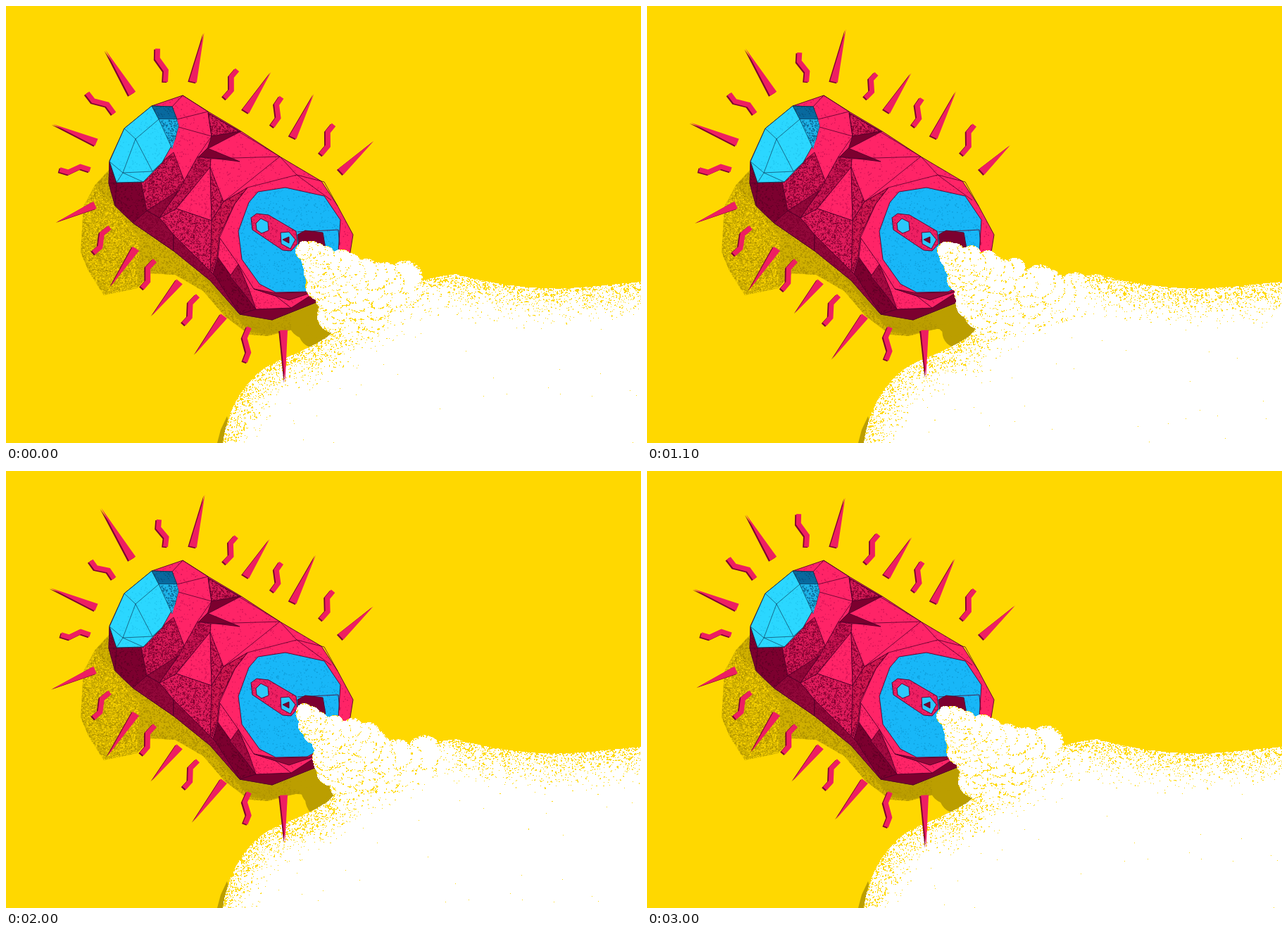
Animation, 902 px wide and 621 px high, one loop 3.1 s. Source, as an HTML page with a canvas:

```html
<!DOCTYPE html>
<html lang="en">
<head>
<meta charset="utf-8">
<title>Fizzing can</title>
<style>
html, body { margin: 0; height: 100%; overflow: hidden; background: #ffd800; }
canvas { display: block; }
</style>
</head>
<body>
<canvas id="stage" width="902" height="621"></canvas>
<script>
const W = 902, H = 621, LOOP = 3100, STEP = 100, TAU = Math.PI * 2;
const YELLOW = '#ffd800', SHADE = '#bb9e00', PINK = '#ff2467', DARK = '#7c002f', INK = '#53002a';

let seed = 7;
function rand() {
  seed = (seed + 0x6d2b79f5) | 0;
  let n = Math.imul(seed ^ (seed >>> 15), 1 | seed);
  n = (n + Math.imul(n ^ (n >>> 7), 61 | n)) ^ n;
  return ((n ^ (n >>> 14)) >>> 0) / 4294967296;
}

function layer(w, h) {
  const c = document.createElement('canvas');
  c.width = w;
  c.height = h;
  return c.getContext('2d', { willReadFrequently: true });
}

const stage = document.getElementById('stage').getContext('2d');
const still = layer(W, H);

// ---- can ----
const toPoints = text => text.split(' ').map(p => p.split(',').map(Number));
const toPath = text => new Path2D('M' + text + 'Z');

function speckle(text, color, density) {
  const pts = toPoints(text), xs = pts.map(p => p[0]), ys = pts.map(p => p[1]);
  const x = Math.min(...xs), y = Math.min(...ys);
  const w = Math.max(...xs) - x, h = Math.max(...ys) - y;
  still.save();
  still.clip(toPath(text));
  still.fillStyle = color;
  for (let i = w * h * density; i > 0; i--) {
    const size = 0.8 + rand() * 0.8;
    still.fillRect(x + rand() * w, y + rand() * h, size, size);
  }
  still.restore();
}

function facet(text, fill, dots, density, outline = INK) {
  const path = toPath(text);
  still.fillStyle = fill;
  still.fill(path);
  if (dots) speckle(text, dots, density);
  if (outline) {
    still.strokeStyle = outline;
    still.lineWidth = 0.9;
    still.stroke(path);
  }
}

function lines(d, color) {
  still.strokeStyle = color;
  still.lineWidth = 0.8;
  still.stroke(new Path2D(d));
}

function drawShadow() {
  facet('147,232 126,255 110,285 106,350 118,378 139,411 186,401 206,380 240,382 280,405 310,440 345,467 372,469 410,459 462,440 450,400 250,300',
    '#d0b000', '#aa8e00', 0.2, null);
  speckle('126,255 110,285 106,350 118,378 139,411 186,401 190,330 150,280', YELLOW, 0.2);
  facet('270,372 300,410 345,462 372,467 412,459 462,462 462,400', SHADE, '#ad9200', 0.1, null);
  facet('300,621 305,602 314,583 325,621', SHADE, null, 0, null);
}

function drawCan() {
  facet('207,142 251,127 287,150 334,178 389,214 448,249 471,284 493,325 489,350 448,418 378,446 332,438 290,390 238,348 180,308 155,284 146,252 147,220 168,174',
    PINK, '#d01255', 0.03);
  // underside
  facet('147,222 157,251 192,250 200,290 238,325 238,348 180,308 155,284 146,252', DARK, '#5c0024', 0.08);
  facet('192,250 222,221 238,208 256,256 240,268 200,291', '#d81a58', DARK, 0.3);
  facet('200,291 245,262 218,301', '#92083a', DARK, 0.2);
  facet('180,308 200,291 218,301 238,325 238,348', '#92083a', DARK, 0.25);
  // crease
  facet('287,152 332,178 292,186', '#d81a58', DARK, 0.3);
  facet('292,185 334,178 286,203', DARK);
  facet('274,214 286,202 332,221', DARK);
  facet('272,214 291,217 290,230 240,289 218,301 245,263', '#c91451', DARK, 0.25);
  facet('290,229 242,288 292,305', PINK, '#d01255', 0.06);
  facet('242,288 292,305 297,358 290,384 238,346 238,325 218,301', '#e01c5c', DARK, 0.22);
  facet('290,229 309,278 292,305', '#d81a58', DARK, 0.25);
  facet('309,278 343,258 325,281 303,326 300,356 290,386 292,305', '#d0174f', DARK, 0.22);
  facet('292,386 301,357 333,402 355,431 332,438', DARK, '#5c0024', 0.1);
  facet('238,325 297,384 332,438 290,390 238,348', '#92083a', DARK, 0.25);
  facet('332,438 355,431 405,429 450,400 448,418 378,446', DARK);
  facet('301,357 304,330 330,367 352,402 383,412 405,429 355,431 333,402', PINK, '#c91451', 0.06);
  facet('330,367 345,402 355,431 333,402 318,384', '#a50b42', DARK, 0.15);
  facet('352,402 383,408 430,407 452,394 450,402 402,418', '#92083a');
  lines('M236,143L251,127M243,161L287,150L292,185L272,214M245,172L292,185M251,127L287,150M291,217L389,214L413,240M309,278L389,214M343,258L413,240L452,250L471,284M413,240L462,276M343,258L325,281L303,330M146,252L157,251L155,284M287,152L389,214', INK);

  // blue base
  facet('207,142 236,143 245,170 240,190 222,222 195,250 157,251 147,221 168,174', '#2bd7ff', '#22c4ee', 0.04, '#12304a');
  facet('207,142 236,143 243,161 217,161', '#08699e', '#064f7c', 0.08, '#12304a');
  facet('217,161 243,161 245,171 236,203', '#1eb4e8', '#0a5f8c', 0.25, null);
  lines('M168,174L184,189L217,161L236,203M184,189L166,237L147,221M157,251L166,237L208,235L222,222M184,189L208,235M166,237L195,250', '#12506f');

  // blue lid
  facet('330,320 345,279 358,264 397,258 452,270 475,304 472,350 448,395 428,406 383,407 360,395 335,360',
    '#18b7f8', '#0f9cd8', 0.05, INK);
  lines('M414,321L472,318L474,340', INK);
  facet('414,325 425,319 450,322 454,345 417,347', DARK);
  facet('348,301 356,295 373,297 412,320 414,338 405,348 393,347 350,318', '#ee1f62', '#b80d4a', 0.08);
  facet('355,309 362,302 372,307 373,319 363,323 356,318', '#2bc8fc');
  facet('390,322 402,321 411,332 404,345 391,338', '#2bc8fc');
  facet('393,332 402,328 402,337', DARK);
}

still.fillStyle = YELLOW;
still.fillRect(0, 0, W, H);
drawShadow();
const ground = layer(W, H);
ground.drawImage(still.canvas, 0, 0);
still.clearRect(0, 0, W, H);
drawCan();

// ---- foam ----
const FX = 300, FY = 300, FW = W - FX, FH = H - FY, LIFE = 1500, CYCLE = 3000;
const foam = layer(FW, FH);
const cloud = new Path2D('M306,640C309,575 343,519 392,502C425,489 440,480 457,470C500,420 570,388 640,381C700,398 760,403 800,401S870,394 980,385V780H306Z');

const raw = Float32Array.from({ length: FW * FH }, rand);
const noise = raw.map((v, i) => {
  const at = k => raw[(i + k) % raw.length];
  return (v + at(1) + at(FW) + at(FW + 1)) / 4;
});

const bubbles = Array.from({ length: 150 }, (_, i) => ({
  born: i / 150,
  side: 2 * ((i * 0.618 + rand() * 0.12) % 1) - 1,
  size: 0.8 + rand() * 0.4
}));

function bubblesAt(ms) {
  return bubbles.map(b => {
    const age = ((ms / CYCLE + b.born) % 1) * CYCLE / LIFE;
    const angle = (41 + 24 * b.side) * Math.PI / 180;
    const reach = 6 + (180 - 55 * b.side) * age ** 1.1;
    return {
      age,
      x: 418 + Math.cos(angle) * reach,
      y: 340 + Math.sin(angle) * reach,
      r: (10 + 16 * age) * b.size
    };
  }).filter(b => b.age < 1).sort((a, b) => b.age - a.age);
}

const gray = v => `rgb(${v},${v},${v})`;

function drawFoam(list, frame) {
  foam.setTransform(1, 0, 0, 1, 0, 0);
  foam.clearRect(0, 0, FW, FH);
  foam.translate(-FX, -FY);

  // brightness is the share of white grain
  foam.save();
  foam.clip(cloud);
  foam.fillStyle = gray(237);
  foam.fill(cloud);
  foam.strokeStyle = 'rgba(0,0,0,.055)';
  for (let w = 8; w < 140; w += 15) {
    foam.lineWidth = w;
    foam.stroke(cloud);
  }
  foam.restore();

  for (const { x, y, r, age } of list) {
    const g = foam.createRadialGradient(x, y, 0, x, y, r);
    g.addColorStop(0, gray(248));
    g.addColorStop(0.66, gray(240));
    g.addColorStop(1, gray(135));
    foam.globalAlpha = Math.min(1, (1 - age) * 4);
    foam.fillStyle = g;
    foam.beginPath();
    foam.arc(x, y, r, 0, TAU);
    foam.fill();
  }
  foam.globalAlpha = 1;

  const img = foam.getImageData(0, 0, FW, FH), px = img.data;
  const shift = frame * 7919;
  for (let i = 0, p = 0; i < noise.length; i++, p += 4) {
    if (px[p + 3] < 128) {
      px[p + 3] = 0;
      continue;
    }
    const white = px[p] / 255 > noise[(i + shift) % noise.length];
    px[p] = px[p + 3] = 255;
    px[p + 1] = white ? 255 : 216;
    px[p + 2] = white ? 255 : 0;
  }
  foam.putImageData(img, 0, 0);
}

function drawFoamShadow(list) {
  stage.fillStyle = SHADE;
  stage.save();
  stage.beginPath();
  stage.rect(405, 400, 70, 86);
  stage.clip();
  for (const { x, y, r } of list) {
    stage.beginPath();
    stage.arc(x - 40, y + 8, r, 0, TAU);
    stage.fill();
  }
  stage.restore();
}

// ---- rays: root x, y, tip x, y, swing, time of longest reach in seconds ----
const spikes = [
  [179, 125, 141, 63, .1, 2], [265, 108, 281, 38, .04, 1.5], [340, 150, 376, 94, .03, .3],
  [407, 187, 437, 125, .05, 1.75], [475, 236, 522, 192, .09, 2.6], [128, 194, 66, 168, .04, 1.4],
  [126, 283, 72, 307, .07, 1.9], [184, 345, 148, 399, .07, 1.7], [246, 392, 207, 440, .06, 2.5],
  [309, 441, 268, 495, .07, 1.3], [394, 461, 396, 535, .06, 0]
];
const squiggles = [
  [153, 153, 115, 124, .08, .4], [226, 108, 215, 61, .1, .2], [310, 131, 328, 91, .08, 2.8],
  [378, 171, 391, 130, .03, 2.8], [447, 211, 465, 169, .03, .4], [119, 233, 76, 233, .06, .8],
  [147, 315, 124, 351, .04, 1], [211, 362, 193, 401, .04, 1.3], [272, 412, 252, 452, .03, .7],
  [345, 457, 339, 506, .05, .2]
];

// maps (along, across) to the stage; along runs 0..1 from root to tip
function rayFrame([x, y, tx, ty, swing, peak], ms) {
  const w = TAU / (LOOP / 1000);
  const k = 1 + swing * (Math.cos(w * (ms / 1000 - peak)) - Math.cos(w * peak));
  const dx = tx - x, dy = ty - y, len = Math.hypot(dx, dy);
  return (along, across) => [
    x + dx * k * along - dy / len * across,
    y + dy * k * along + dx / len * across
  ];
}

function drawRays(ms) {
  stage.miterLimit = 4;
  for (const [color, ox, oy] of [[DARK, -1.3, 0.9], ['#ee1e62', 0.5, -0.3]]) {
    stage.save();
    stage.translate(ox, oy);
    stage.fillStyle = stage.strokeStyle = color;
    for (const ray of spikes) {
      const at = rayFrame(ray, ms);
      stage.fill(toPath([at(0, -5.5), at(0, 5.5), at(1, 0)].join(' ')));
    }
    stage.lineWidth = 7;
    for (const ray of squiggles) {
      const at = rayFrame(ray, ms);
      stage.stroke(new Path2D('M' + [at(0, 0), at(0.32, 4.5), at(0.72, -3.5), at(1, 0)].join('L')));
    }
    stage.restore();
  }
}

// ---- playback ----
let shown = -1;
function tick(now) {
  const frame = Math.floor((now % LOOP) / STEP);
  if (frame !== shown) {
    shown = frame;
    const ms = frame * STEP, list = bubblesAt(ms);
    drawFoam(list, frame % 30);
    stage.drawImage(ground.canvas, 0, 0);
    drawFoamShadow(list);
    stage.drawImage(still.canvas, 0, 0);
    stage.drawImage(foam.canvas, FX, FY);
    drawRays(ms);
  }
  requestAnimationFrame(tick);
}
const start = performance.now();
requestAnimationFrame(function run() { tick(Math.max(0, performance.now() - start)); });
</script>
</body>
</html>
```
